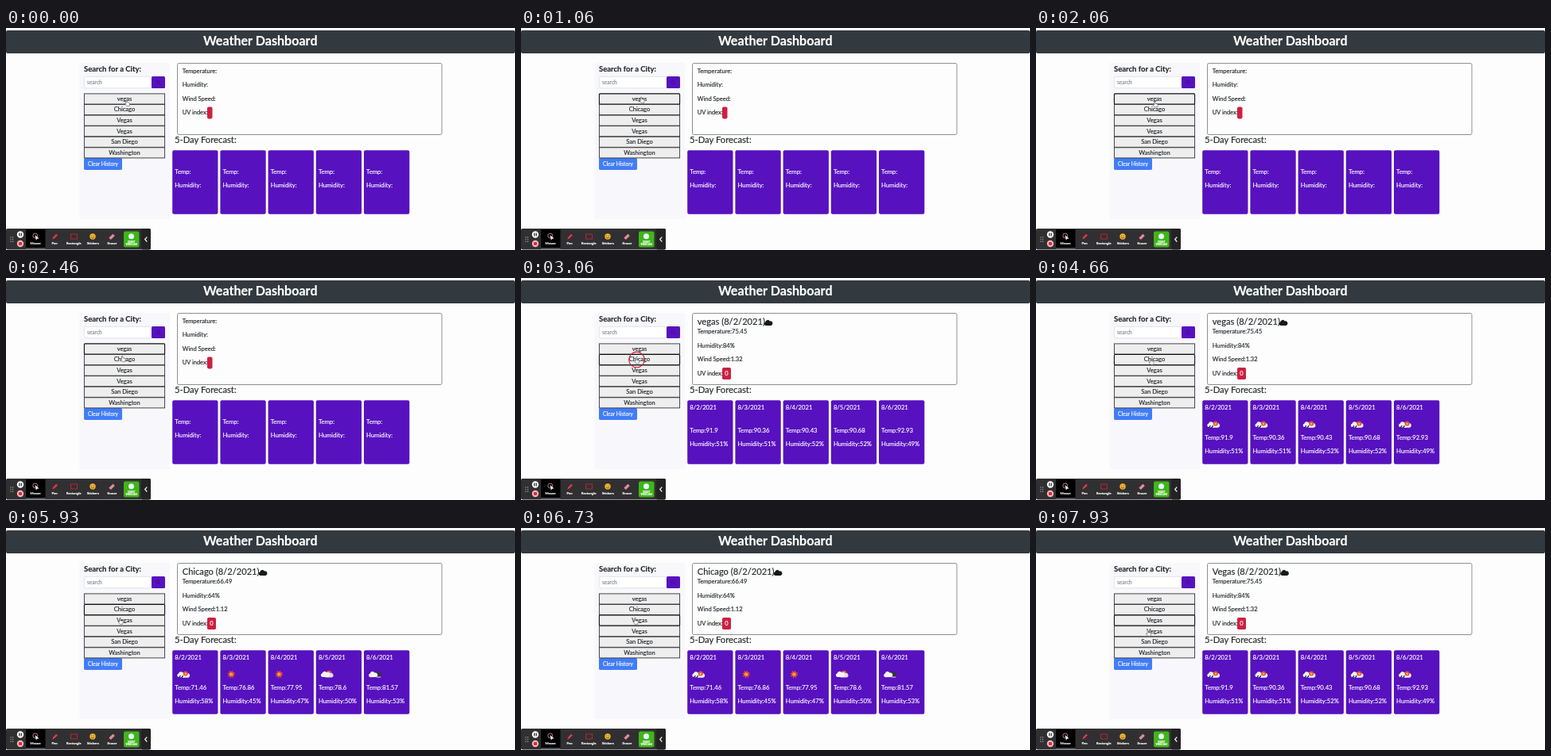
An HTML page that plays this animation: 640x280 px, repeating every 8000 ms.

```html
<!DOCTYPE html>
<html lang="en">
<head>
<meta charset="utf-8">
<title>Weather Dashboard</title>
<style>
  html, body { margin: 0; width: 100%; height: 100%; overflow: hidden; background: #fdfdfd; }
  svg { display: block; width: 640px; height: 280px; font: 7.5px Lato, sans-serif; }
  text { stroke-width: .16px; }
</style>
</head>
<body>
<svg viewBox="0 0 640 280">
  <defs>
    <path id="cloud" d="M2.4 7.5a2.4 2.4 0 0 1-.4-4.7A3.1 3.1 0 0 1 7.7 1.9 2.4 2.4 0 0 1 9.4 7.4z"/>
    <g id="sun" fill="none" stroke="#e8502c">
      <circle r="4" stroke-width="1.5" stroke-dasharray="1.3 1.84"/>
      <circle r="2.7" fill="#f4a04a" stroke-width="1.2"/>
    </g>
    <g id="clouds">
      <use href="#cloud" x="5" y="-4.3" fill="#39313f"/>
      <path d="M10 3.6h5.5" stroke="#ddd8e6"/>
      <use href="#cloud" y="-3.8" fill="#f4f2f8"/>
    </g>
    <g id="partly">
      <circle cx="10.5" cy="-1.5" r="3.2" fill="#e8502c"/>
      <use href="#cloud" x="4.5" y="-3.4" fill="#e6d9df"/>
      <use href="#cloud" y="-4" fill="#f4f2f8"/>
    </g>
    <g id="rain">
      <use href="#cloud" y="-3.7" fill="#f4f2f8"/>
      <use href="#cloud" x="4.6" y="-3.2" fill="#f4f2f8"/>
      <circle cx="10.8" cy="-1" r="3" fill="#e24a30"/>
      <circle cx="10.8" cy="-.6" r="1.4" fill="#f6b06a"/>
      <path d="M2.2 4.6l2.2-3M5.8 4.6l1.8-3" stroke="#2c2340" stroke-width="1.3"/>
    </g>
    <g id="sunny"><use href="#sun" x="8"/></g>
    <path id="hand" d="M-1.7-4.2q.8-.7 1.5 0v2.8l3 .7q1 .4.8 1.5l-.6 3H-.8l-2.5-3q-.2-1 .7-.9l.9.7z"
      fill="#fff" stroke="#444" stroke-width=".6"/>
  </defs>
  <g id="page"></g>
  <g id="results"></g>
  <g id="pointer"></g>
</svg>
<script>
const LOOP = 8000;
const PURPLE = '#5711bf', INK = '#24282c', RED = '#cd2040';
const get = id => document.getElementById(id);
const text = (x, y, str, fill = INK, more = '') =>
  `<text x="${x}" y="${y}" fill="${fill}" stroke="${fill}" ${more}>${str}</text>`;
const box = (x, y, w, h, fill, more = '') =>
  `<rect x="${x}" y="${y}" width="${w}" height="${h}" fill="${fill}" ${more}/>`;
const middle = 'text-anchor="middle"';

const cities = ['vegas', 'Chicago', 'Vegas', 'Vegas', 'San Diego', 'Washington'];
const nevada = {
  now: ['75.45', '84%', '1.32'],
  temps: [91.9, 90.36, 90.43, 90.68, 92.93], humidity: [51, 51, 52, 52, 49],
  icons: Array(5).fill('rain')
};
const illinois = {
  now: ['66.49', '64%', '1.12'],
  temps: [71.46, 76.86, 77.95, 78.6, 81.57], humidity: [58, 45, 47, 50, 53],
  icons: ['rain', 'sunny', 'sunny', 'partly', 'clouds']
};
// Searches in order of arrival
const loads = [
  { at: 2660, city: 'vegas', cloudX: 305.5, ...nevada },
  { at: 5130, city: 'Chicago', cloudX: 317.5, ...illinois },
  { at: 7130, city: 'Vegas', cloudX: 307, ...nevada }
];
const ICONS_READY = 3430;
const clicks = [{ at: 660, button: 0 }, { at: 2930, button: 1 }, { at: 6330, button: 2 }];
const RING_TIME = 270;
// Time, x, y
const path = [[0, 152.5, 95], [560, 152, 91], [1400, 152, 91], [2060, 150, 96.5], [2660, 146, 104],
  [3060, 145.5, 104.5], [4660, 145, 106], [5330, 145, 106], [5930, 144, 118], [7600, 144, 118], [7930, 141.5, 133]];

function toolbar() {
  const labels = ['Mouse', 'Pen', 'Rectangle', 'Stickers', 'Eraser'];
  let out = box(0, 253, 182, 26.5, '#303032', 'rx="2"') + box(25, 254, 24.5, 24, '#000')
    + box(25, 277.6, 24.5, .9, '#7d8ea0') + box(170, 253, 12, 26.5, '#232325', 'rx="2"');
  for (let i = 0; i < 6; i++) out += `<circle cx="${6 + i % 2 * 2.6}" cy="${264 + (i >> 1) * 2.6}" r=".7" fill="#aaa"/>`;
  out += '<circle cx="18" cy="260.5" r="4.2" fill="#fff"/><path d="M16.8 258.6v3.8M19.2 258.6v3.8" stroke="#222" stroke-width="1.2"/>'
    + '<circle cx="18" cy="272" r="4.2" fill="#f3b9bc"/>' + box(15.9, 269.9, 4.2, 4.2, '#d92f3a', 'rx="1"');
  labels.forEach((label, i) =>
    out += text(37 + i * 24.1, 273, label, '#fff', middle + ' font-size="4.3" font-weight="700"'));
  return out + `
    <circle cx="36.8" cy="262" r="3" fill="none" stroke="#d8848c" stroke-width=".9"/>
    <path d="M36.5 261l5 4.6-2.4.2-1.2 2z" fill="#fff"/>
    <path d="M58.3 266.6l.8-2.6 4-4.3 1.8 1.7-4.2 4.2z" fill="#e63946"/>
    <rect x="81.5" y="260" width="8" height="6" fill="none" stroke="#b52531" stroke-width="1"/>
    <circle cx="109" cy="263" r="3.7" fill="#f5b82e"/>
    <path d="M107.2 262h1M109.9 262h1M107 264q2 2.3 4 0" fill="none" stroke="#6b3b12" stroke-width=".8"/>
    <path d="M129.3 264.8l5-5 2.6 2.3-5 4.8z" fill="#e58a9a"/>
    ${box(148, 256.5, 19.5, 20, '#3fb618', 'rx="2"')}
    <circle cx="157.5" cy="262.8" r="3.5" fill="#e8f6ff"/>
    ${text(157.7, 270.5, 'START', '#fff', middle + ' font-size="3.2" font-weight="700"')}
    ${text(157.7, 274, 'WEBCAM', '#fff', middle + ' font-size="3.2" font-weight="700"')}
    <path d="M177.3 263.7l-2.6 2.9 2.6 2.9" fill="none" stroke="#fff" stroke-width="1.2"/>`;
}

get('page').innerHTML =
  box(0, 3, 640, 29, '#323a3f', 'rx="2"')
  + text(319.7, 22, 'Weather Dashboard', '#fff', middle + ' font-size="16.1" font-weight="700"')
  + box(92.5, 44, 113.5, 197, '#f7f7fc')
  + text(98, 55.3, 'Search for a City:', INK, 'font-size="9.5" font-weight="700"')
  + box(98.3, 61.3, 85, 14.5, '#fff', 'stroke="#ced4da" stroke-width=".6" rx="1.5"')
  + text(102, 70.8, 'search', '#858b91', 'font-size="6.6"')
  + box(183, 61, 17, 15, PURPLE, 'rx="1.5"')
  + '<circle cx="191" cy="68" r="2" fill="none" stroke="#40108f" stroke-width=".9"/><path d="M192.5 69.5l2 2" stroke="#40108f"/>'
  + box(98, 164, 48, 15, '#427df6', 'rx="1.8"')
  + text(122, 173.9, 'Clear History', '#fff', middle + ' font-size="6.6"')
  + box(215.5, 44.5, 332.5, 90, '#fdfdfd', 'stroke="#6c6c6c" stroke-width=".75" rx="2"')
  + text(212, 145.4, '5-Day Forecast:', INK, 'font-size="11.25"')
  + toolbar();

function buttons(focused) {
  return cities.map((city, i) => {
    const y = 82.9 + i * 13.58, active = i === focused;
    return box(98.4, y, 101.2, 13.1, '#eee',
      active ? 'stroke="#101010" stroke-width="1.1" rx="1"' : 'stroke="#333" stroke-width=".9"')
      + text(149, y + 9, city, INK, middle);
  }).join('');
}

function current(data) {
  const shift = data ? 13.6 : 0;
  let out = data ? text(221.7, 59.4, `${data.city} (8/2/2021)`, INK, 'font-size="11.15"')
    + `<use href="#cloud" transform="translate(${data.cloudX} 52.5) scale(.95 1)" fill="#16181a"/>` : '';
  ['Temperature:', 'Humidity:', 'Wind Speed:', 'UV index:'].forEach((label, i) =>
    out += text(221.7, 56.7 + shift + i * 17.55, label + (data && data.now[i] || '')));
  return out + (data
    ? box(253, 113, 11, 15, RED, 'rx="1.8"') + text(258.5, 123.2, '0', '#fff', middle)
    : box(253, 99.4, 6.5, 15, RED, 'rx="1.8"'));
}

function forecast(data, showIcons) {
  const white = (x, y, str) => text(x, y, str, '#fff', 'font-size="7.7"');
  let out = '';
  for (let i = 0; i < 5; i++) {
    const x = 209 + i * 60.2, left = x + 3.3;
    const y = !data ? 183.5 : showIcons ? 203.6 : 194.5;
    out += box(x + .2, 154.2, 57.3, 80.6, PURPLE, 'rx="2"')
      + white(left, y, 'Temp:' + (data ? data.temps[i] : ''))
      + white(left, y + 17.6, 'Humidity:' + (data ? data.humidity[i] + '%' : ''));
    if (data) out += white(left, 165.5, `8/${i + 2}/2021`);
    if (data && showIcons) out += `<use href="#${data.icons[i]}" x="${x + 6}" y="184.5"/>`;
  }
  return out;
}

function position(t) {
  const next = path.findIndex(p => p[0] > t);
  if (next < 0) return path[path.length - 1].slice(1);
  const [t0, x0, y0] = path[next - 1], [t1, x1, y1] = path[next];
  const k = (t - t0) / (t1 - t0), ease = k * k * (3 - 2 * k);
  return [x0 + (x1 - x0) * ease, y0 + (y1 - y0) * ease];
}

let shown;
function draw(now) {
  const t = now % LOOP;
  const data = loads.filter(l => l.at <= t).pop();
  const click = clicks.filter(c => c.at <= t).pop();
  const showIcons = t >= ICONS_READY;
  const key = [data && data.at, click && click.at, showIcons].join();
  if (key !== shown) {
    shown = key;
    get('results').innerHTML = buttons(click ? click.button : -1) + current(data) + forecast(data, showIcons);
  }
  const [x, y] = position(t);
  const ring = click && t - click.at < RING_TIME
    ? `<circle cx="${x}" cy="${y - 1.5}" r="${5 + 4.8 * Math.min(1, (t - click.at) / 120)}" fill="none" stroke="${RED}" stroke-width="1.2"/>` : '';
  get('pointer').innerHTML = ring + `<use href="#hand" transform="translate(${x} ${y}) scale(.88)"/>`;
  requestAnimationFrame(() => draw(performance.now()));
}
draw(0);
</script>
</body>
</html>
```
